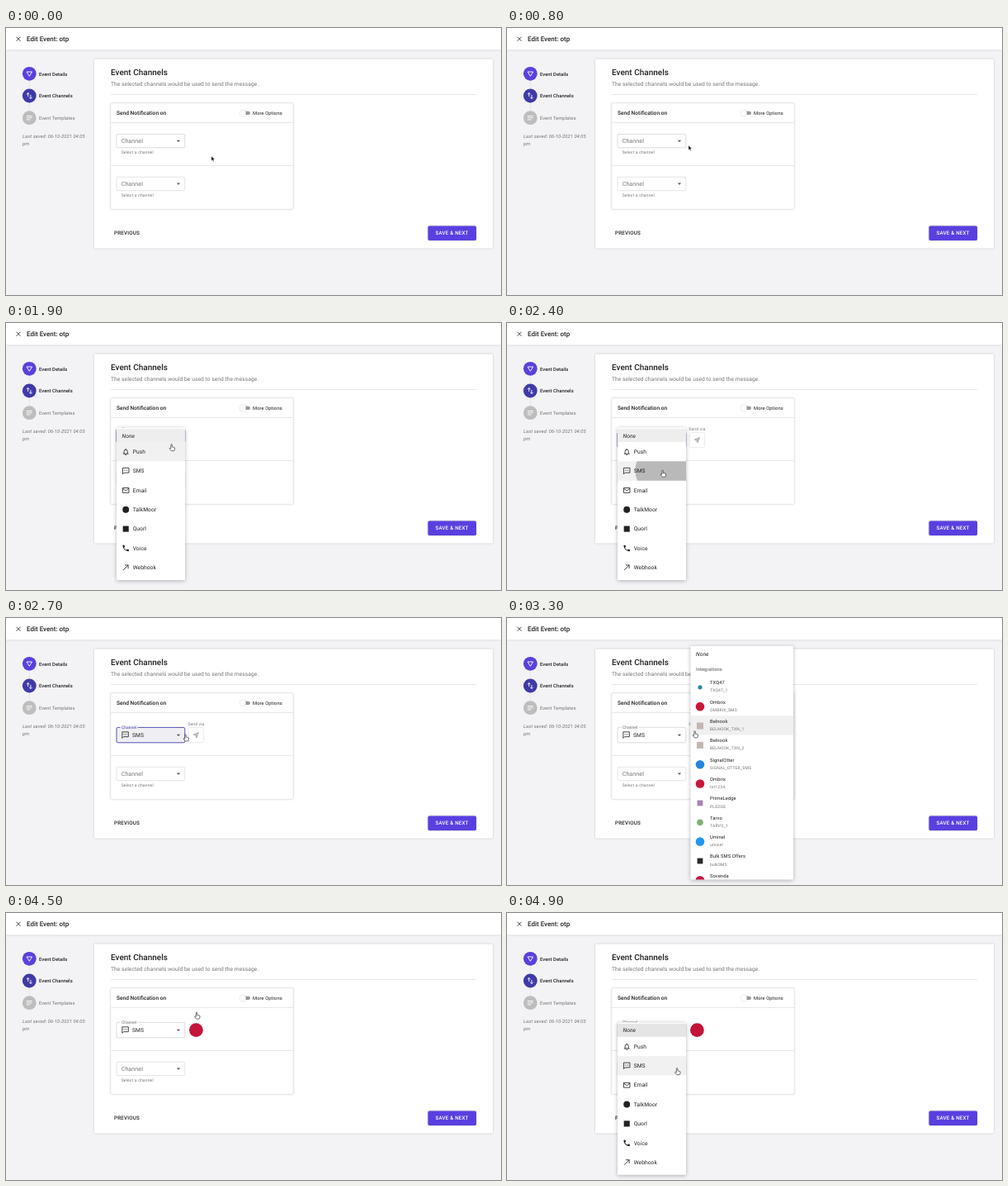
These frames come from a looping animation (600 px wide and 323 px high, 5000 ms). An HTML page:

```html
<!DOCTYPE html>
<html lang="en">
<head>
<meta charset="utf-8">
<title>Edit Event</title>
<style>
html, body { margin: 0; width: 100%; height: 100%; overflow: hidden; background: #f3f3f6; }
#stage { display: block; width: 600px; height: 323px; }
text { font-family: Roboto, sans-serif; fill: #222; text-rendering: geometricPrecision; white-space: pre; }
.head { font-size: 8px; font-weight: 500; }
.title { font-size: 10px; font-weight: 500; }
.sub { font-size: 6.67px; letter-spacing: .06px; }
.bold { font-size: 6.6px; font-weight: 500; }
.step { font-size: 5.83px; letter-spacing: .04px; }
.body { font-size: 5.83px; letter-spacing: .0625px; }
.item { font-size: 6.67px; letter-spacing: .0625px; }
.hold { font-size: 7.1px; letter-spacing: .08px; }
.cap { font-size: 5px; letter-spacing: .167px; }
.label { font-size: 5px; }
.btn { font-size: 6.25px; font-weight: 500; letter-spacing: .178px; }
.med { font-weight: 500; }
.it { font-style: italic; }
.grey { fill: #757575; }
.line { fill: none; stroke: #222; stroke-width: 2; }
.white { fill: none; stroke: #fff; stroke-width: .9; }
.rule { stroke: #e2e2e4; stroke-width: .8; }
.paper { fill: #fff; filter: drop-shadow(0 1.5px 2.5px rgba(0,0,0,.28)); }
.card { fill: #fff; filter: drop-shadow(0 .4px .8px rgba(0,0,0,.2)); }
</style>
</head>
<body>
<svg id="stage" viewBox="0 0 600 323" xmlns="http://www.w3.org/2000/svg"></svg>
<script>
const stage = document.getElementById('stage');
const LOOP = 5000, STEP = 100, ROW = 23.35;

const text = (x, y, s, cls) => `<text x="${x}" y="${y}" class="${cls}">${s}</text>`;
const rect = (x, y, w, h, attrs) => `<rect x="${x}" y="${y}" width="${w}" height="${h}" ${attrs}/>`;
const circle = (x, y, r, fill, id = '') => `<circle ${id && `id="${id}"`} cx="${x}" cy="${y}" r="${r}" fill="${fill}"/>`;
const rule = (x1, y1, x2, y2) => `<path class="rule" d="M${x1} ${y1}L${x2} ${y2}"/>`;
const caret = y => `<path d="M206.8 ${y - 1}h4.4l-2.2 2.2z" fill="#555"/>`;

// 24-unit icons, drawn at 10px
const line = d => `<path class="line" d="${d}"/>`;
const bubble = line('M3 3h18v14H7l-4 4z') + line('M6.8 10h2.2m2 0h2m2 0h2.2');
const icon = (x, y, art) => `<g transform="translate(${x - 5} ${y - 5}) scale(.4167)">${art}</g>`;

const channels = [
  ['Push', line('M4 18h16M7 18v-7a5 5 0 0 1 10 0v7M10 21h4M12 3v3')],
  ['SMS', bubble],
  ['Email', line('M3 5h18v14H3zM3 7l9 6 9-6')],
  ['TalkMoor', circle(12, 12, 9.5, '#222')],
  ['Quorl', rect(3.5, 3.5, 17, 17, 'fill="#222"')],
  ['Voice', '<path fill="#222" d="M6.6 10.8c1.5 2.8 3.800 5.100 6.600 6.600l2.200-2.200q.5-.5 1-.2 1.700.5 3.600.5 1 0 1 1V20q0 1-1 1C10.600 21 3 13.400 3 4q0-1 1-1h3.500q1 0 1 1 0 1.900.6 3.600.2.5-.3 1z"/>'],
  ['Webhook', line('M4.500 19.500L19 5M9 5h10v10')]
];

// name, id, mark colour, mark radius, square?
const providers = [
  ['TXQ47', 'TXQ47_1', '#2f86a0', 2.6],
  ['Ombrix', 'OMBRIX_SMS', '#c8173a', 5.3],
  ['Belnook', 'BELNOOK_TXN_1', '#c3b6b2', 4, 1],
  ['Belnook', 'BELNOOK_TXN_2', '#c3b6b2', 4, 1],
  ['SignalOtter', 'SIGNAL_OTTER_SMS', '#2484dd', 5.3],
  ['Ombrix', 'tst1234', '#c8173a', 5.3],
  ['PrimeLedge', 'PLEDGE', '#a583b4', 3.4, 1],
  ['Tarvo', 'TARVO_1', '#7fae74', 3.8],
  ['Uminel', 'uminel', '#2196f3', 5.3],
  ['Bulk SMS Offers', 'bulkSMS', '#2a2a2a', 3.4, 1],
  ['Sovenda', 'SOVENDA', '#c5174a', 5.3]
];

const page = [
  rect(0, 0, 600, 323, 'fill="#f3f3f6"'),
  rect(0, 0, 600, 26.5, 'class="card"'),
  '<path d="M12.500 10.800l5 5m0-5l-5 5" stroke="#333" stroke-width=".9"/>',
  text(25, 16, 'Edit Event: otp', 'head'),
  rule(28.3, 63, 28.3, 74), rule(28.3, 90, 28.3, 100),
  circle(28.3, 55.3, 8.4, '#5b40dd'),
  circle(28.3, 82, 8.4, '#403aa8'),
  circle(28.3, 108.7, 8.4, '#bdbdbd'),
  '<path class="white" d="M25 53h6.600l-3.300 5.300z"/>',
  '<path class="white" d="M26.700 83v-4.500m-1.700 1.700l1.700-1.700 1.700 1.700M29.900 81v4.500m-1.700-1.700l1.700 1.700 1.700-1.700"/>',
  '<path class="white" d="M24.800 106.500h7m-7 2.200h7m-7 2.200h4.500"/>',
  text(40, 57.5, 'Event Details', 'step med'),
  text(40, 84.2, 'Event Channels', 'step med'),
  text(40, 110.8, 'Event Templates', 'step grey'),
  text(20, 133.2, 'Last saved: 06-10-2021 04:05', 'body it grey'),
  text(20, 141.500, 'pm', 'body it grey'),
  rect(107, 37.5, 483, 229, 'rx="1" class="card"'),
  text(127, 56.6, 'Event Channels', 'title'),
  text(127, 70.3, 'The selected channels would be used to send the message.', 'sub grey'),
  rule(127, 80.5, 570, 80.5),
  rect(127, 91, 221, 128, 'rx="1.5" class="card" stroke="#e4e4e6" stroke-width=".5"'),
  text(134, 105.2, 'Send Notification on', 'bold'),
  rect(285, 100.8, 11, 4.2, 'rx="2.1" fill="#999"'),
  `<circle cx="287.300" cy="102.900" r="3.500" class="card"/>`,
  text(299, 105, 'More Options', 'body'),
  rule(127, 114.5, 348, 114.5), rule(127, 166.5, 348, 166.5),
  text(131, 250.3, 'PREVIOUS', 'btn'),
  rect(511.5, 239.5, 58.5, 17.5, 'rx="1.700" fill="#5a3fe0" style="filter:drop-shadow(0 .6px .9px rgba(0,0,0,.3))"'),
  '<text x="520.500" y="250.300" class="btn" style="fill:#fff">SAVE &amp; NEXT</text>',
  rect(134, 180.3, 82.8, 16.4, 'rx="1.600" fill="none" stroke="#c8c8c8" stroke-width=".5"'),
  text(139.7, 190.9, 'Channel', 'hold grey'),
  caret(188.5),
  text(139.7, 204.3, 'Select a channel', 'cap grey')
].join('');

const field = `
  <path id="box"/>
  <g id="empty">${text(139.7, 152.2, 'Select a channel', 'cap grey')}</g>
  <g id="hint">${text(139.7, 138.9, 'Channel', 'hold grey')}</g>
  <text id="label" x="140" class="label">Channel</text>
  <g id="caret">${caret(0)}</g>
  <g id="value">${icon(144.6, 141.6, bubble)}${text(153, 143.9, 'SMS', 'item')}</g>
  <g id="via">
    <g id="send">${text(220.3, 130.3, 'Send via', 'cap grey')}
      ${rect(221.700, 133, 17.300, 17, 'rx="1.500" class="card"')}
      <path d="M233.500 138.400l-6.300 2.700 2.700 1.200 1.100 2.700z" fill="#c8c8c8" stroke="#8c8c8c" stroke-width=".6"/></g>
    ${circle(230.4, 141.6, 8.4, '#c4153a', 'chosen')}
  </g>`;

const channelMenu = `<g id="list">
  ${rect(134, 126.5, 83, 184.5, 'rx="1.600" class="paper"')}
  ${rect(134, 128, 83, 16, 'id="none"')}
  ${text(140.5, 138.5, 'None', 'item it')}
  ${rect(134, 0, 83, ROW, 'id="hover" fill="#f1f1f1"')}
  <svg x="134" y="167.300" width="83" height="${ROW}">${circle(55.5, 11, 34, '#000', 'wave')}</svg>
  ${channels.map(([name, art], i) => {
    const y = 155.700 + i * ROW;
    return icon(145.2, y, art) + text(153.700, y + 2.3, name, 'item');
  }).join('')}</g>`;

const providerMenu = `<g id="plist">
  ${rect(222.5, 34, 124.5, 282.5, 'rx="1.600" class="paper"')}
  <svg x="222.500" y="34" width="124.500" height="282.500" viewBox="222.500 34 124.500 282.500">
    ${text(229, 46.4, 'None', 'item it')}
    ${text(229, 64.2, 'Integrations', 'step med grey')}
    ${rect(222.5, 0, 124.5, ROW, 'id="phover" fill="#f0f0f0"')}
    <svg x="222.500" y="94.850" width="124.500" height="${ROW}">${circle(41, 6, 45, '#000', 'pwave')}</svg>
    ${providers.map(([name, id, fill, r, square], i) => {
      const y = 83.2 + i * ROW;
      const mark = square ? rect(234 - r, y + .6 - r, 2 * r, 2 * r, `fill="${fill}"`) : circle(234, y + .6, r, fill);
      return mark + text(246, y - 3, name, 'body') + text(246, y + 6.2, id, 'cap grey');
    }).join('')}
  </svg></g>`;

const pointer = `<g id="cursor">
  <path id="arrow" d="M-1-3v5.600l1.300-1.200.9 2 .9-.4-.9-1.900h1.700z" stroke="#fff" stroke-width=".35"/>
  <path id="hand" d="M-1.600 1V-3.200q0-.7.7-.7t.7.7V-.6l2.400.5q1 .3.900 1.200l-.4 2.200q-.2.9-1 .9h-2.400q-.6 0-1-.5L-3.400 1.200q.6-.9 1.800 0z" fill="#fff" stroke="#222" stroke-width=".65"/>
</g>`;

stage.innerHTML = page + field + channelMenu + providerMenu + pointer;

const $ = id => document.getElementById(id);
const set = (id, attrs) => { for (const k in attrs) $(id).setAttribute(k, attrs[k]); };
const show = (id, on) => set(id, { visibility: on ? 'visible' : 'hidden' });

// piecewise linear track: rows of [ms, ...values]
function track(rows, t) {
  let i = 0;
  while (i < rows.length - 1 && rows[i + 1][0] <= t) i++;
  const a = rows[i], b = rows[i + 1] || a;
  const k = b === a ? 0 : Math.max(0, (t - a[0]) / (b[0] - a[0]));
  return a.slice(1).map((v, n) => v + (b[n + 1] - v) * k);
}

const path = [
  [0, 250, 158], [600, 250, 158], [700, 242, 155], [800, 221, 145], [900, 206.5, 139],
  [1700, 206.5, 139], [1800, 205, 142], [2000, 198, 159], [2200, 190.5, 179], [2300, 189.5, 182],
  [2400, 189.5, 182], [2500, 194, 176], [2700, 218.5, 144.7], [2900, 228.5, 140.7],
  [3500, 228.5, 140.7], [3700, 236, 132], [3900, 254, 111], [4100, 263.5, 101],
  [4400, 263.5, 101], [4500, 232, 124], [4600, 208, 143], [4700, 208, 144], [4900, 207, 191.5]
];
const listFade = [
  [0, 0], [1300, 0], [1400, .45], [1500, .85], [1600, 1], [2400, 1], [2500, .8], [2600, .35], [2700, 0],
  [4500, 0], [4600, .3], [4700, .75], [4800, .97], [4900, 1]
];
const providerFade = [
  [0, 0], [2900, 0], [3000, .2], [3100, .6], [3200, .92], [3300, 1], [4200, 1], [4300, .6], [4400, .12], [4500, 0]
];

// fade with growth from an anchor point
function grow(id, u, x, y, dy = 0) {
  const p = 1 - Math.pow(1 - u, 2.6);
  show(id, u > 0);
  set(id, {
    opacity: u,
    transform: `translate(${x} ${y + dy}) scale(${.75 + .25 * p} ${.5625 + .4375 * p}) translate(${-x} ${-y})`
  });
}

function outline(top, h, gap) {
  const start = gap ? 159.5 : 140, back = gap ? 138.5 : 140;
  return `M${start} ${top}H215.200q1.600 0 1.600 1.600v${h - 3.2}q0 1.600-1.600 1.600H135.600q-1.600 0-1.600-1.600v${3.2 - h}q0-1.600 1.600-1.600H${back}`;
}

function drawField(t) {
  const filled = t >= 2400, focus = t >= 1400 && t < 3000, raised = filled || focus;
  const top = filled ? 132.4 : 128.4, h = filled ? 18.4 : 16.4;
  set('box', {
    d: outline(top, h, raised),
    fill: focus ? '#efeff3' : 'none',
    stroke: focus ? '#3a36ad' : '#b9b9b9',
    'stroke-width': focus ? .85 : .5
  });
  set('label', { y: top + 1.7, style: `fill:${focus ? '#3f3ba8' : '#6c6c6c'}` });
  set('caret', { transform: `translate(0 ${filled ? 141.7 : 136.7})` });
  show('label', raised);
  show('hint', !raised);
  show('empty', !filled);
  show('value', filled);
  show('send', filled && t < 4300);
  show('chosen', t >= 4300);
}

function hover(id, i, first, count, visible) {
  const on = visible && i >= 0 && i < count;
  set(id, { y: first + i * ROW, opacity: on ? 1 : 0 });
}

function draw(t) {
  const [x, y] = track(path, t), tip = y - 4;
  const [u] = track(listFade, t), [v] = track(providerFade, t);
  const again = t >= 4500, dy = again ? 5.8 : 0;
  drawField(t);

  grow('list', u, 134, 136, dy);
  set('none', { fill: again ? '#e5e5e5' : '#eeeeee' });
  const closing = t >= 2400 && t < 2800;
  hover('hover', closing ? 1 : Math.floor((tip - 144 - dy) / ROW), 144, channels.length, u > 0);
  set('wave', { r: 34 + Math.max(0, t - 2400) * .3, opacity: closing ? .23 : 0 });

  grow('plist', v, 222.5, 141);
  const picked = t >= 4200;
  hover('phover', picked ? 1 : Math.floor((tip - 71.5) / ROW), 71.5, providers.length, v > 0);
  set('pwave', { r: 45 + Math.max(0, t - 4200) * .4, opacity: picked ? .17 : 0 });

  set('cursor', { transform: `translate(${x} ${y})` });
  show('arrow', t < 900);
  show('hand', t >= 900);
}

const begin = performance.now();
function tick() {
  const t = (performance.now() - begin) % LOOP;
  draw(Math.floor(t / STEP) * STEP);
  requestAnimationFrame(tick);
}
tick();
</script>
</body>
</html>
```
